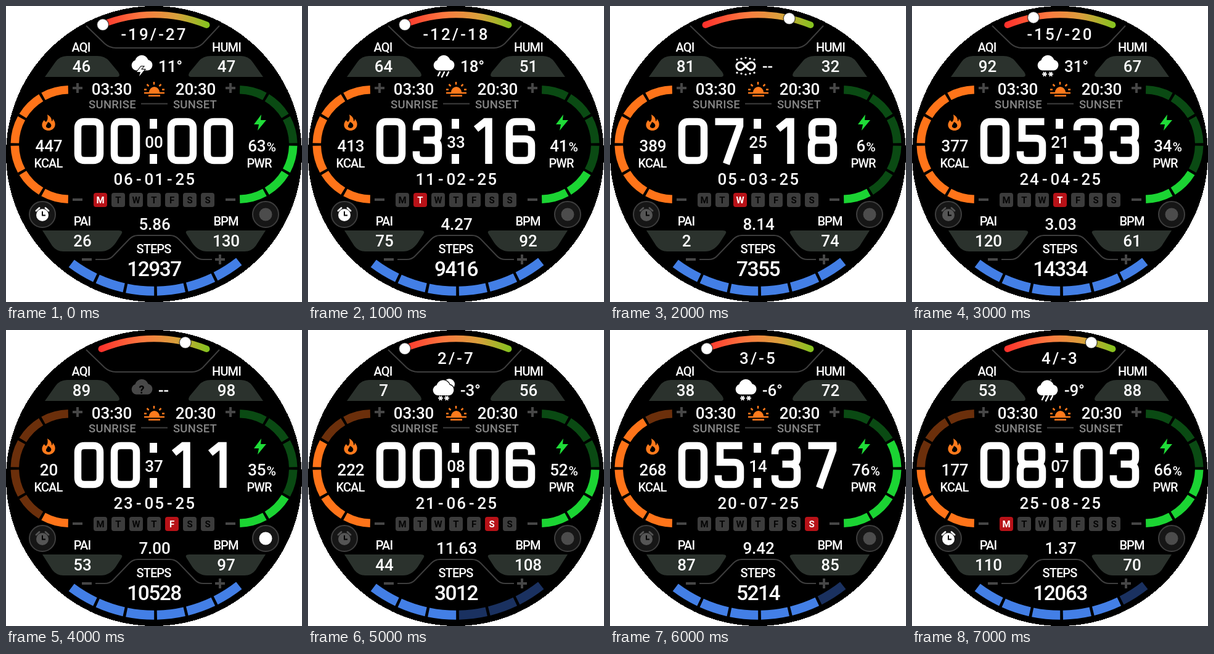
Write an HTML page that moves like this. It is 480 by 480 pixels and loops after 8 s.

```html
<!DOCTYPE html>
<html lang="en">
<head>
<meta charset="utf-8">
<title>Watch face</title>
<style>
html, body { margin: 0; width: 100%; height: 100%; overflow: hidden; background: #fff; }
svg { display: block; width: 100vw; height: 100vh; }
text { font-family: Roboto, "Open Sans", sans-serif; font-weight: 450; fill: #fff; text-anchor: middle; }
.value { font-size: 26px; letter-spacing: -.1px; }
.label { font-size: 20px; letter-spacing: -.9px; font-weight: 500; }
.sun { font-size: 18.5px; letter-spacing: .3px; fill: #858585; }
.steps { font-size: 33.5px; letter-spacing: -1.5px; }
.range { font-size: 26px; letter-spacing: 3.1px; }
.date { font-size: 26px; }
.day { font-size: 15px; font-weight: 700; }
.line { fill: none; stroke: #3e3e3e; stroke-width: 2; }
.mark { fill: none; stroke: #464646; stroke-width: 4; }
.panel { fill: #2b322d; }
.digit { fill: none; stroke: #fff; stroke-width: 11.5; }
</style>
</head>
<body>
<svg viewBox="0 0 480 480">
  <defs>
    <linearGradient id="heat" gradientUnits="userSpaceOnUse" x1="150" x2="330" y1="0" y2="0">
      <stop offset="0" stop-color="#ff2f2b"/>
      <stop offset=".4" stop-color="#fb7a40"/>
      <stop offset=".7" stop-color="#d9a03c"/>
      <stop offset="1" stop-color="#82c41e"/>
    </linearGradient>
    <path id="cloud" d="M211 104.500a8.500 8.500 0 0 1-1.500-16.500a11 11 0 0 1 21-.8a8.800 8.800 0 0 1-.5 17.300z"/>
    <path id="flake" d="M-4 0H4M-2-3.500L2 3.500M2-3.500L-2 3.500" stroke="#fff" stroke-width="1.800"/>
    <g id="side">
      <path class="panel" d="M63 115L80 91Q87 81 99 81H148Q160 81 167 89L182 107Q187 115 179 115Z"/>
      <path class="panel" d="M59 364H183Q191 364 187 370L178 384Q168 398 154 398H93Q82 398 75 389Z"/>
      <path class="mark" d="M108 133h16M116 125v16M108 314h16"/>
      <circle class="line" cx="59" cy="338" r="21" style="fill:#161616"/>
    </g>
  </defs>
  <circle cx="240" cy="240" r="240" shape-rendering="crispEdges"/>
  <use href="#side"/>
  <use href="#side" transform="matrix(-1 0 0 1 480 0)"/>
  <path class="line" d="M130 32L160 61Q168 68 178 68H302Q311 68 319 61L346 32"/>
  <path class="line" d="M145 411H160Q168 411 173 406L200 378Q206 372 214 372H266Q274 372 280 378L307 406Q312 411 320 411H334M219 158.500H262"/>
  <path class="mark" d="M123 411h16M339 411h16M347 403v16"/>
  <path d="M154.800 30.700A226 226 0 0 1 325.200 30.700" fill="none" stroke="url(#heat)" stroke-width="10.500" stroke-linecap="round"/>
  <path fill="#ff7a1c" fill-rule="evenodd" d="M67 176C74 180 74 184 74 187Q76 186 76 183C84 192 78 202 69 202C59 202 55 192 62 185Q63 188 65 188C68 185 68 181 67 176ZM68 188C73 190 75 194 72 197Q69 199 66 197C63 194 67 192 68 188Z"/>
  <path fill="#1fdc38" d="M414 176L402 192H410L408 202L422 185H413Z"/>
  <g fill="none" stroke="#ff7a1c" stroke-width="2.500">
    <path d="M224 141H257M231 145.500H250M240 123v4.500M228.500 127l3 3M251.500 127l-3 3M224 135.500h4M253 135.500h4"/>
    <path d="M232 140a8.500 9 0 0 1 17 0z" fill="#ff7a1c" stroke="none"/>
  </g>
  <path fill="#fff" d="M233 183h12v16h-12zM233 240h12v16h-12z"/>
  <g id="labels"></g>
  <g id="live"></g>
</svg>
<script>
const DIGITS = {
  0: 'M11 0H25Q36 0 36 11V52Q36 63 25 63H11Q0 63 0 52V11Q0 0 11 0Z',
  1: 'M5 12L20 0H25.5V68.5',
  3: 'M0 14V11Q0 0 11 0H25Q36 0 36 11V20Q36 30 26 30H12M26 30Q36 31 36 41V52Q36 63 25 63H11Q0 63 0 52V48',
  5: 'M39 0H3V27H25Q36 27 36 38V52Q36 63 25 63H11Q0 63 0 52V48',
  6: 'M36 15V11Q36 0 25 0H11Q0 0 0 11V52Q0 63 11 63H25Q36 63 36 52V38Q36 28 25 28H0',
  7: 'M-5 0H35V7L13 68.5',
  8: 'M11 0H25Q35 0 35 10V20Q35 30 25 30H11Q1 30 1 20V10Q1 0 11 0ZM11 30H25Q36 30 36 41V52Q36 63 25 63H11Q0 63 0 52V41Q0 30 11 30'
};

// rings: lit segments for kcal, power, steps; knob: angle from the top
const STATES = [
  { time: '00:00:00', date: '06-01-25', day: 0, range: '-19/-27', knob: -21.6, sky: 'storm', temp: '11°', aqi: 46, humi: 47, kcal: 447, power: 63, pai: 26, bpm: 130, km: '5.86', steps: 12937, rings: [6, 3, 6], alarm: 1 },
  { time: '03:16:33', date: '11-02-25', day: 1, range: '-12/-18', knob: -21.6, sky: 'rain', temp: '18°', aqi: 64, humi: 51, kcal: 413, power: 41, pai: 75, bpm: 92, km: '4.27', steps: 9416, rings: [6, 2, 6], alarm: 1 },
  { time: '07:18:25', date: '05-03-25', day: 2, range: '', knob: 13, sky: 'haze', temp: '--', aqi: 81, humi: 32, kcal: 389, power: 6, pai: 2, bpm: 74, km: '8.14', steps: 7355, rings: [6, 1, 6] },
  { time: '05:33:21', date: '24-04-25', day: 3, range: '-15/-20', knob: -11, sky: 'snow', temp: '31°', aqi: 92, humi: 67, kcal: 377, power: 34, pai: 120, bpm: 61, km: '3.03', steps: 14334, rings: [6, 2, 6] },
  { time: '00:11:37', date: '23-05-25', day: 4, range: '', knob: 13, sky: 'unknown', temp: '--', aqi: 89, humi: 98, kcal: 20, power: 35, pai: 53, bpm: 97, km: '7.00', steps: 10528, rings: [1, 2, 6], link: 1 },
  { time: '00:06:08', date: '21-06-25', day: 5, range: '2/-7', knob: -21.6, sky: 'nightSnow', temp: '-3°', aqi: 7, humi: 56, kcal: 222, power: 52, pai: 44, bpm: 108, km: '11.63', steps: 3012, rings: [4, 3, 3] },
  { time: '05:37:14', date: '20-07-25', day: 6, range: '3/-5', knob: -21.6, sky: 'snow', temp: '-6°', aqi: 38, humi: 72, kcal: 268, power: 76, pai: 87, bpm: 85, km: '9.42', steps: 5214, rings: [5, 4, 5] },
  { time: '08:03:07', date: '25-08-25', day: 0, range: '4/-3', knob: 13, sky: 'nightRain', temp: '-9°', aqi: 53, humi: 88, kcal: 177, power: 66, pai: 110, bpm: 70, km: '1.37', steps: 12063, rings: [3, 3, 5], alarm: 1 }
];

const text = (s, x, y, cls = 'value', extra = '') => `<text class="${cls}" x="${x}" y="${y}" ${extra}>${s}</text>`;

const polar = (cx, cy, r, deg) => {
  const a = deg * Math.PI / 180;
  return `${(cx + r * Math.sin(a)).toFixed(2)} ${(cy - r * Math.cos(a)).toFixed(2)}`;
};

// six segments, angles clockwise from the top, lit ones first
function ring(cx, cy, r, width, start, step, gap, lit, on, off) {
  let out = '';
  for (let i = 0; i < 6; i++) {
    const dir = Math.sign(step);
    const a = start + i * step + dir * gap, b = start + (i + 1) * step - dir * gap;
    out += `<path d="M${polar(cx, cy, r, a)}A${r} ${r} 0 0 ${dir > 0 ? 1 : 0} ${polar(cx, cy, r, b)}" fill="none" stroke="${i < lit ? on : off}" stroke-width="${width}"/>`;
  }
  return out;
}

const cloud = '<use href="#cloud" fill="#fff"/>';
const frontCloud = '<use href="#cloud" fill="#fff" stroke="#000" stroke-width="2.5" paint-order="stroke" transform="translate(-1 1.5)"/>';
const flakes = '<use href="#flake" x="215" y="110.5"/><use href="#flake" x="225" y="110.5"/>';
const drops = '<path d="M214 107l-3 6M221 107l-4 8M228 107l-3 6" stroke="#fff" stroke-width="2.5" stroke-linecap="round"/>';
const dots = [-14, -7, 0, 7, 14].map(d =>
  [-1, 1].map(s => `<circle cx="${220 + d}" cy="${97.5 + s * (13.5 - Math.abs(d) / 5)}" r="1.6" fill="#fff"/>`).join('')).join('');

const SKY = {
  storm: cloud + '<path d="M219 98L212 107H218L216 114L225 103H219L223 98Z" fill="#fff" stroke="#000" stroke-width="2" paint-order="stroke"/>',
  rain: cloud + drops,
  snow: cloud + flakes,
  haze: dots + '<path d="M215.5 93L224.5 102A6.2 6.2 0 1 0 224.5 93L215.5 102A6.2 6.2 0 1 1 215.5 93Z" fill="none" stroke="#fff" stroke-width="3.2"/>',
  unknown: '<use href="#cloud" fill="#484848"/>' + text('?', 220, 103, 'day', 'style="fill:#000;font-size:18px"'),
  nightSnow: '<circle cx="229" cy="88" r="9" fill="#fff"/>' + frontCloud + flakes,
  nightRain: '<path d="M226 80A9 9 0 1 0 236 93A10 10 0 0 1 226 80Z" fill="#fff"/>' + frontCloud + drops
};

function clock(time) {
  const [h, m, s] = time.split(':');
  const glyphs = [...h + m].map((d, i) =>
    `<path class="digit" d="${DIGITS[d]}" transform="translate(${[116.5, 175.5, 267.5, 326.5][i]} 187.5)"/>`).join('');
  return `<g role="img" aria-label="${h}:${m}">${glyphs}</g>` + text(s, 240, 230);
}

const week = day => [...'MTWTFSS'].map((c, i) => {
  const x = 153 + 29 * i, on = i === day;
  return `<rect x="${x - 11}" y="303" width="22" height="23" rx="4" fill="${on ? '#b81218' : '#3c3c3c'}"/>` +
    text(c, x, 320, 'day', on ? '' : 'style="fill:#050505"');
}).join('');

function alarm(on) {
  const c = on ? '#fff' : '#555';
  return `<circle cx="59" cy="339" r="10" fill="${c}"/>
    <path d="M49 332l5-4.5M69 332l-5-4.5" stroke="${c}" stroke-width="2.8" stroke-linecap="round"/>
    <path d="M59 333v6.5h5" fill="none" stroke="#000" stroke-width="2"/>`;
}

function draw(s) {
  const [kcal, power, steps] = s.rings;
  const [kx, ky] = polar(240, 240, 225.5, s.knob).split(' ');
  const spaced = [...s.date].map((c, i) => (181.8 + 16.7 * i).toFixed(1)).join(' ');
  return ring(103, 224.5, 88.7, 13.5, 180, 30, 1.4, kcal, '#ff7419', '#6b2f0b') +
    ring(377, 224.5, 88.7, 13.5, 180, -30, 1.4, power, '#1bd433', '#0a4a13') +
    ring(240, 240, 222.3, 15, 217.6, -12.75, .6, steps, '#437fe6', '#1a3160') +
    `<circle cx="${kx}" cy="${ky}" r="9.5" fill="#fff" stroke="#000" stroke-opacity=".6" stroke-width="1.5"/>` +
    text(s.range, 240.5, 55, 'range') +
    SKY[s.sky] + text(s.temp, 247, 107, 'value', 'style="text-anchor:start"') +
    text(s.aqi, 122.5, 107) + text(s.humi, 357.5, 107) +
    text(s.kcal, 69.5, 236) +
    text(`${s.power}<tspan font-size="21" dx="1">%</tspan>`, 415, 236) +
    clock(s.time) +
    text(s.date, spaced, 289.5, 'date') +
    week(s.day) + alarm(s.alarm) +
    `<circle cx="421" cy="338" r="10.5" fill="${s.link ? '#fff' : '#4c4c4c'}"/>` +
    text(s.pai, 124, 390) + text(s.bpm, 357, 390) +
    text(s.km, 241, 363) + text(s.steps, 240, 437.5, 'steps');
}

document.getElementById('labels').innerHTML =
  [['AQI', 121.5, 74], ['HUMI', 357.5, 74], ['KCAL', 68.5, 262], ['PWR', 410.5, 262],
   ['PAI', 123.5, 356], ['BPM', 356.5, 356], ['STEPS', 239.5, 401]].map(l => text(...l, 'label')).join('') +
  text('SUNRISE', 172.5, 166, 'sun') + text('SUNSET', 306.5, 166, 'sun') +
  text('03:30', 171.5, 144) + text('20:30', 307.5, 144);

const live = document.getElementById('live');
let shown = -1;
function tick() {
  const i = Math.floor(performance.now() / 1000) % STATES.length;
  if (i !== shown) live.innerHTML = draw(STATES[shown = i]);
  requestAnimationFrame(tick);
}
tick();
</script>
</body>
</html>
```
